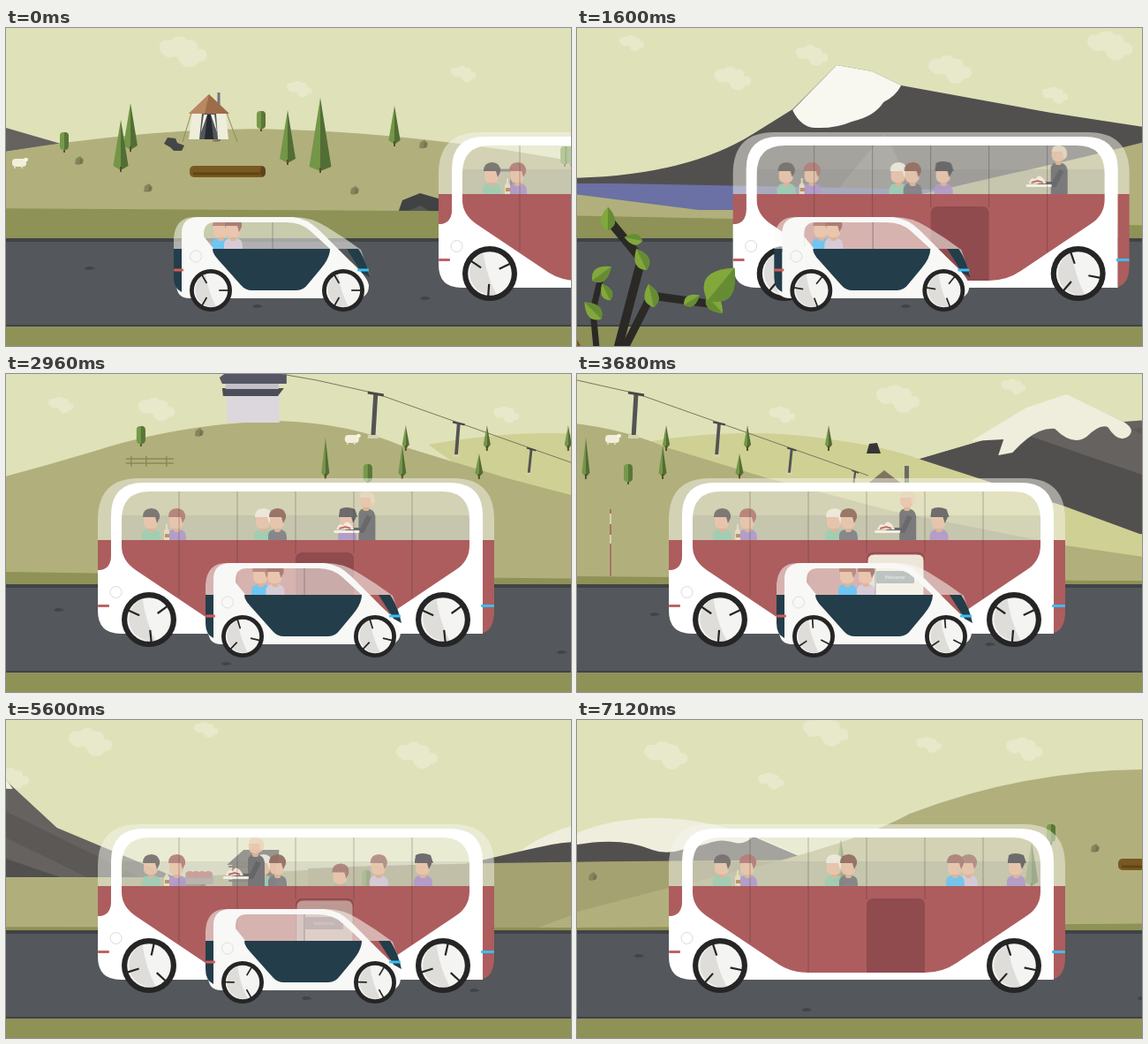
Write an HTML page that moves like this. It is 640 by 360 pixels and loops after 7200 ms.

```html
<!DOCTYPE html>
<html lang="en">
<head>
<meta charset="utf-8">
<title>Bus ride</title>
<style>
html,body{margin:0;width:100%;height:100%;overflow:hidden;background:#dfe1b9}
svg{display:block;width:640px;height:360px}
text{font:italic 6px Lato,sans-serif}
</style>
</head>
<body>
<svg id="stage" viewBox="0 0 640 360"></svg>
<script>
const LOOP = 7200, STEP = 80;
const STOPS = [0, 1040, 2240, 3680, 4800, 6480, 7120];
const OLIVE = '#b1b07c', LIGHT = '#cfd093', GRASS = '#8e9256', RIVER = '#6b70a5';
const DARK = '#52504f', MID = '#65625f', SNOW = '#efeedd', RED = '#ad5d5e';

const ramp = (t, a, b) => Math.max(0, Math.min(1, (t - a) / (b - a)));
const ease = (t, a, b) => { const u = ramp(t, a, b); return u * u * (3 - 2 * u); };
const degrees = a => a * 180 / Math.PI;

// The ride slows down gently
const scroll = t => .555 * t - 1e-5 * t * t;

// Layers: the time at which local places equal screen places, and the relative speed
const LAYERS = {
  far: [0, .95], peak: [1040, 1.05], range: [4800, .91], snow: [6480, .95],
  ground: [0, 1], meadow: [3680, 1.19], near: [0, 1], marks: [0, 1]
};

const path = (d, fill, more = '') => `<path d="${d}" fill="${fill}" ${more}/>`;
const poly = (p, fill) => `<polygon points="${p}" fill="${fill}"/>`;
const rect = (x, y, w, h, fill, r = 0) => `<rect x="${x}" y="${y}" width="${w}" height="${h}" rx="${r}" fill="${fill}"/>`;
const line = (d, color, w = 1) => `<path d="${d}" fill="none" stroke="${color}" stroke-width="${w}"/>`;
const oval = (x, y, a, b, fill) => `<ellipse cx="${x}" cy="${y}" rx="${a}" ry="${b}" fill="${fill}"/>`;
const group = (id, ...body) => `<g id="${id}">${body.join('')}</g>`;
const shift = (x, y, ...body) => `<g transform="translate(${x} ${y})">${body.join('')}</g>`;
const scene = (i, ...body) => shift(scroll(STOPS[i]), 0, ...body);
const skyScene = (i, ...body) => shift(scroll(STOPS[i]) * .95, 0, ...body);
const repeat = (n, f) => Array.from({ length: n }, (_, i) => f(i)).join('');

const cloud = (x, y, k) => `<g transform="translate(${x} ${y}) scale(${k})" fill="#e8e8cb">
  <rect x="-24" y="-12" width="40" height="15" rx="7"/><circle cx="-3" cy="-5" r="11"/>
  <circle cx="7" cy="5" r="11"/><rect x="-5" y="-3" width="30" height="13" rx="6"/><circle cx="-13" cy="-3" r="9"/></g>`;
const cloudPair = (x, y) => cloud(x, y, 1) + cloud(x + 131, y - 14, .57);
const cloudRow = (x, y) => cloud(x, y, 1) + cloud(x + 119, y + 29, .6) + cloud(x + 181, y - 27, 1.05) +
  cloud(x + 298, y - 12, .58) + cloud(x + 406, y - 7, .85);

const cone = (x, base, h, w = h * .3) =>
  poly(`${x},${base - h} ${x - w / 2},${base - 5} ${x},${base}`, '#739647') +
  poly(`${x},${base - h} ${x + w / 2},${base - 5} ${x},${base}`, '#526d35') + rect(x - 1, base - 4, 2, 6, '#59522b');
const bush = (x, top, h = 20) => rect(x - 1, top + h - 4, 2, 7, '#5f552e') +
  rect(x - 5, top, 10, h, '#779a49', 4) + path(`M${x} ${top}q5 0 5 5v${h - 10}q0 5 -5 5z`, '#5a7638');
const rock = (x, y) => path(`M${x - 5} ${y + 4}l1 -6 5 -3 4 4 -1 4 -5 2z`, '#85855d') +
  path(`M${x} ${y + 4}l1 -7 3 3 -1 4z`, '#74744f');
const log = (x, y, w, h = 13) => rect(x, y, w, h, '#795922', 5) +
  line(`M${x + 4} ${y + h * .7}h${w - 10}`, '#624515', 3) + oval(x + w - 3, y + h / 2, 3, h / 2 - .5, '#5d431c');
const sheep = (x, y) => rect(x - 8, y - 4, 16, 9, '#f1efda', 4) + rect(x + 5, y - 5, 5, 4, '#f7f5e4', 2) +
  line(`M${x - 5} ${y + 4}v3m8 -3v3`, '#e5e2c9', 1.5);
const crack = (x, y) => path(`M${x - 6} ${y}l4 -2 5 .5 3 2 -4 1 -5 .5z`, '#414447');

const sky = () =>
  skyScene(0, cloud(200, 27, 1.1), cloud(332, 69, .58), cloud(518, 52, .58), poly('-150,70 0,113 62,131 0,140 -150,160', MID)) +
  skyScene(1, cloudPair(212, 31), cloud(457, 57, .85), cloud(547, 31, .75)) +
  skyScene(2, cloudRow(108, 47)) +
  skyScene(3, cloudPair(363, 28), cloud(232, 46, .6)) +
  skyScene(4, cloudPair(438, 25), cloud(350, 66, .75)) +
  skyScene(5, cloud(102, 40, .95), cloudRow(355, 40));

const peak = () =>
  path('M185 168L290 170Q430 170 510 120L555 92 605 42 645 49 678 65 848 96 1018 122 1140 145V190H185z', DARK) +
  path('M658 120Q681 150 681 190H600z', MID) +
  path('M555 93L605 42 645 49 678 65Q672 77 658 84Q648 100 622 106Q604 114 580 113Q564 112 555 93z', '#f8f8f1');

const range = () =>
  path('M-94 83L-19 61 30 25 75 10 140 40 235 33 290 14 332 72 386 122 520 178H-94z', MID) +
  poly('-94,83 -19,61 30,55 190,110 390,178 -94,180', DARK) + poly('150,49 235,33 260,70 480,178 420,178 250,95', '#5b5856') +
  path('M-33 62L30 24 75 9 138 39Q154 48 146 56Q135 66 122 46Q113 42 98 57Q82 68 62 48Q40 46 14 75L-2 78 4 60z', SNOW) +
  path('M221 34L292 14 336 78Q302 76 281 84Q256 88 251 70Q254 54 237 52Q217 48 221 34z', SNOW);

const snowHill = () =>
  path('M205 160Q260 110 350 111Q430 113 520 160z', SNOW) +
  path('M150 165Q225 147 255 141Q305 132 340 147Q365 156 398 136L450 130 520 160V170H150z', DARK) +
  path('M380 146L400 134 455 131Q444 143 430 138Q417 134 402 140z', SNOW);

const ground = () =>
  scene(1, poly('190,176 340,176 760,184 760,206 190,206', RIVER)) +
  scene(4, path('M-60 184Q300 177 560 178L700 170 1600 164V240H-60z', '#b0ae7b')) +
  scene(5, path('M-40 168Q120 160 640 158V240H-40z', '#a5a271'));

const meadow = () =>
  poly('648,187 1000,187 900,205 735,214', RIVER) +
  path('M60 80Q180 58 280 73Q350 82 390 97L553 150 640 182 740 213H500L200 180z', LIGHT);

const hills = () =>
  path('M-60 150Q150 112 300 114.5Q420 117 566 138L746 168 836 185 1000 206V240H-60z', OLIVE) +
  scene(2, path('M-80 216L0 202 160 165Q320 130 460 88Q560 56 670 53Q750 55 815 83L930 118 1070 155 1267 194 1390 212 1460 240H-80z', OLIVE)) +
  scene(6, path('M-60 240L0 217 104 190Q307 145 377 106Q507 57 640 56L760 56V240z', OLIVE));

function scenery() {
  const camp = line('M210 96L200 129M250 96L262 129', '#8d8a62') + rect(239.5, 73, 3, 17, '#77727a') +
    poly('211,97 249,97 252,126 207,126', '#efeddb') + poly('222,97 238,97 240,126 219,126', '#53565a') +
    poly('228,98 232,98 235,126 225,126', '#252a30') + poly('224,98 228,98 221,118', '#f7f4e5') + poly('236,98 232,98 239,118', '#f7f4e5') +
    poly('207,97 230,75 253,97', '#9d6c49') + poly('207,97 230,75 225,97', '#b88862') +
    path('M179 131l4 -7 9 1 2 5 8 3 -3 6h-9l-4 -4z', '#454646');
  const boulder = path('M441 218l8 -23 20 -8 24 7 10 14 -8 21 -45 -1z', '#414244') + path('M450 209l20 -8 20 14v13h-40z', '#535455');
  const hiker = shift(132, 0, oval(0, 134, 4, 5, '#e0b99a'), path('M-5 132q1 -4 6 -3l4 5z', '#a55b54'),
    rect(2, 142, 7, 13, '#85888d', 2), rect(-4, 139, 8, 17, '#56575e', 3),
    line('M-1 154L-2 176M2 154L6 175', '#43434b', 4), line('M-4 177h4m4 -1h4', '#eee2c6', 3),
    line('M-4 145L-9 151M-9 149L-19 173', '#73664d', 1.5));
  const fence = line('M498 96h54M498 101h54M504 93v12m17 -12v12m23 -12v12', '#898a51', 1.4);
  const tower = rect(612, 24, 60, 31, '#dcd7dc') + poly('607,16 677,16 670,25 608,25', '#4d4d59') +
    rect(611, 9, 60, 8, '#c4c0c8') + poly('604,4 620,-8 680,-8 680,11 607,11', '#565764');
  const stake = (x, y, h) => line(`M${x} ${y}v${h}`, '#a97369', 2) + line(`M${x} ${y + 5}v12m0 12v10`, '#d9d0ad', 2);
  // Pylons shrink into the distance
  const pylon = i => {
    const k = .76 ** i, x = 67 + 94 * (1 - .875 ** i) / .125, y = 22 + (x - 67) * .355;
    return line(`M${x} ${y}l-3 ${50 * k}`, '#535354', 5 * k) + line(`M${x - 9 * k} ${y - 1}l${18 * k} 3`, '#484849', 3 * k) +
      rect(x - 3 - 6 * k, y + 47 * k, 12 * k, 4 * k, '#d6d1b3');
  };
  const lift = line('M-40 0L0 7 67 22 330 115', '#77785f') + repeat(4, pylon) + poly('328,90 331,79 340,78 344,90', '#343638');
  const cabin = log(550, 182, 37, 11) + rect(563, 177, 33, 9, '#8f8a83', 2) + repeat(4, i => oval(569 + 7 * i, 175, 5, 4, '#b75751')) +
    rect(617, 158, 50, 40, '#493e2c') + repeat(4, i => line(`M613 ${166 + 8 * i}h54`, '#342e25', 2)) +
    poly('611,164 630,147 670,147 670,164', '#373732');

  return repeat(6, i => rock(83 + 78 * i, 150 + 34 * Math.sin(i * 2))) +
    cone(141, 138, 53) + cone(130, 161, 57) + cone(319, 153, 60) + cone(356, 162, 83) + cone(440, 132, 44) +
    bush(66, 118) + bush(289, 94) + bush(633, 134) + camp + log(208, 156, 86) + sheep(15, 152) + boulder +
    scene(1, bush(74, 134), bush(236, 169), hiker, line('M-25 161H10V226M6 158V224', '#44443f', 3)) +
    scene(2, bush(515, 59), rock(581, 66), fence, tower, stake(486, 148, 38)) +
    scene(3, lift, repeat(3, i => cone(101 + 92 * i, 85, 27) + cone(10 + 87 * i, 117, 45 - 9 * i, 9)),
      bush(58, 102), sheep(40, 73), stake(38, 153, 76), poly('320,132 348,109 378,132', '#80745f'), rect(371, 104, 5, 25, '#6b6968')) +
    scene(4, bush(489, 155), cabin) +
    scene(5, bush(26, 170), cone(567, 188, 53)) +
    scene(6, bush(537, 118), cone(515, 188, 50), rock(18, 177), rock(587, 145), log(613, 157, 86));
}

const marks = () => repeat(22, i => crack(95 + 190 * i, [272, 315, 306, 267, 328][i % 5]));
const strip = poly('-60,204 640,208 1193,219 1907,229 2500,234 3445,235 4300,229 4300,242 -60,242', GRASS);

function wheel(cls, x, y, r) {
  const q = r * .8;
  return shift(x, y, `<circle r="${r}" fill="#252525"/><circle r="${q}" fill="#f4f4f2"/>`,
    path(`M${-q * .3} ${-q * .95}A${q} ${q} 0 0 0 ${q * .3} ${q * .95}Q${-q * .15} ${q * .1} ${-q * .3} ${-q * .95}z`, '#deddda'),
    `<g class="${cls}">`, repeat(3, i => `<path transform="rotate(${120 * i})" d="M${q * .48} 0H${q + 1}" stroke="#252525" stroke-width="${r / 14}"/>`), '</g>');
}

// Seated figure whose waist is at the local zero point
const person = (shirt, hair, hat) =>
  path('M-10 1V-6Q-9 -12 -2 -12H4Q11 -11 11 -3V1z', shirt) + rect(-3, -17, 7, 8, '#deb59b', 2) +
  rect(-8, -30, 16, 17, '#e9c6ad', 6) + path('M-9 -26Q-9 -36 1 -36Q11 -35 10 -25L7 -19 5 -26z', hair) +
  (hat ? path('M-9 -27L-8 -35Q-1 -39 9 -35L12 -26z', hair) : '');

const waiter = path('M-9 1V-30Q-8 -36 0 -36Q9 -35 10 -27V1z', '#747477') + rect(-4, -41, 7, 8, '#ddb493', 2) +
  rect(-8, -53, 15, 16, '#e9c6ad', 6) + path('M-8 -48Q-8 -56 1 -55Q11 -54 9 -42L6 -39 4 -48z', '#e8d8c1') +
  line('M3 -27L-5 -11H-24', '#626266', 6) + rect(-37, -11, 29, 3, '#f5f2e9', 1) +
  path('M-34 -12q2 -8 8 -5 3 -7 9 0l3 5z', '#f7eee0') + line('M-31 -13l7 -2 6 2', '#c06961', 2);

// Riders: looks, place along the bus, boarding time
const riders = [
  { look: ['#9fceb4', '#77716f'], x: () => 60 },
  { look: ['#b29bcb', '#b48079'], x: () => 89 },
  { look: ['#9fceb4', '#eeeade'], x: () => 187 },
  { look: ['#828286', '#956d63'], x: () => 203 },
  { look: ['#b29bcb', '#656366', true], x: t => Math.min(393, 186 + .0325 * t) },
  { look: ['#d7cbd8', '#b28c84'], x: t => 257 + 82 * ease(t, 5000, 5900), board: 5000 },
  { look: ['#70c5f2', '#ab817a'], x: t => 257 + 67 * ease(t, 5300, 6200), board: 5300 }
];

const bus = () =>
  path('M104 188V165Q104 118 151 118H506Q553 118 553 165V188z', 'rgba(246,246,238,.5)') +
  rect(131, 160, 394, 28, 'rgba(120,120,120,.14)') +
  '<g opacity=".92">' + riders.map((r, i) => group('rider' + i, person(...r.look))).join('') + group('waiter', waiter) +
  path('M179 188v-10l2 -3v-5h2v5l2 3v10z', '#e8dfc3') + rect(180, 181, 5, 4, '#b99165') + '</g>' +
  path('M119 188V160Q119 123 156 123H502Q540 123 540 160V294H130Q104 294 104 268V222Q119 222 119 205zM131 188V165Q131 133 163 133H493Q525 133 525 165V188z', '#fff', 'fill-rule="evenodd"') +
  path('M104 188H119V205Q119 222 104 222z', RED) + path('M540 188H553V268Q553 290 540 293z', RED) +
  path('M131 188H525V194Q525 212 509 222L430 275Q414 286 394 286H262Q243 286 229 277L147 222Q131 211 131 195z', RED) +
  path('M328 286V210Q328 202 336 202H386Q394 202 394 210V286z', '#8f4b4e') +
  group('door', path('M329 286V212Q329 204 337 204H385Q393 204 393 212V286z', '#eee7d9', `stroke="${RED}"`),
    rect(331, 220, 7, 66, '#cfccc4'), rect(339, 223, 43, 14, '#777e80', 1),
    '<text x="360" y="232" text-anchor="middle" fill="#e2ede7">Welcome</text>') +
  repeat(5, i => line(`M${196 + 66 * i} 133V${[252, 286, 203, 203, 254][i]}`, 'rgba(65,45,45,.4)', .8)) +
  rect(104, 261, 13, 3, '#bd6463', 1) + rect(538, 261, 15, 3, '#39bff4', 1) +
  '<circle cx="124.500" cy="247" r="6.500" fill="none" stroke="#dadada"/>' +
  wheel('busSpin', 162, 278, 31) + wheel('busSpin', 495, 278, 31);

function car() {
  const panel = '#233d4a';
  return path('M226 250V238Q228 214 249 214H362Q382 214 399 225Q419 237 438 251L448 280 424 250z', 'rgba(250,250,244,.55)') +
    group('friendA', person('#70c5f2', '#ba8b80')) + group('friendB', person('#d7cbd8', '#aa7d76')) +
    path('M235 250V232Q235 214 255 214H360Q377 215 392 230L426 264Q445 281 447 291Q447 306 432 306H244Q229 306 229 290L235 286zM260 250V233Q260 220 273 220H354Q370 220 381 230L403 250z', '#f8f8f6', 'fill-rule="evenodd"') +
    path('M260 236L272 251H260z', '#f8f8f6') +
    path('M226 250H235V299Q226 295 226 282z', panel) + path('M422 250H435Q444 263 448 282L439 277z', panel) +
    path('M270 250H403Q403 260 393 272L378 290Q373 297 365 297H315Q307 297 302 291L277 263Q270 256 270 250z', panel) +
    line('M338 220V250', 'rgba(60,60,70,.45)', .8) +
    rect(226, 272.5, 11, 3, '#d35c58', 1) + rect(434, 272.5, 13, 3, '#39bff4', 1) +
    '<circle cx="251" cy="258.500" r="6.500" fill="none" stroke="#e0dfdb"/>' +
    wheel('carSpin', 268, 297, 24) + wheel('carSpin', 418, 297, 24);
}

const oncoming = () => path('M551 221L553 196Q556 186 572 186H690Q744 188 755 217V251H562Q551 250 551 238z', '#f5f5ef') +
  path('M553 208V200Q556 191 570 191H690Q722 192 735 209z', '#d4d5bd') +
  path('M548 210H622Q621 220 611 232Q603 243 594 243H570Q557 241 551 230z', '#a1d7bb') +
  rect(552, 215, 15, 3, '#fff', 1) + wheel('fastSpin', 634, 244, 18) + wheel('fastSpin', 724, 244, 18);

function branch() {
  const leaf = (x, y, n, a, w = n * .6) => `<g transform="translate(${x} ${y}) rotate(${a})">` +
    path(`M${-n / 2} 0Q${-n / 6} ${-w} ${n / 2} 0Q${-n / 6} ${w} ${-n / 2} 0z`, '#82a83c') +
    path(`M${-n / 2} 0Q${-n / 6} ${w} ${n / 2} 0z`, '#668c33') + '</g>';
  // Each stem carries leaves along its pieces, turned to alternate sides
  const stem = (color, w, ...p) => line('M' + p.join('L'), color, w) + p.slice(1).map(([x, y], i) => {
    const [a, b] = p[i], dir = degrees(Math.atan2(y - b, x - a)), side = i % 2 ? 40 : -40;
    return leaf(x, y, 27, dir + side) + (b < 340 ? leaf((x + a) / 2 + side / 4, (y + b) / 2, 21, dir - side) : '');
  }).join('');
  const brown = '#66490f', black = '#2b2926';
  return stem(brown, 6, [372, 320], [374, 243], [345, 222]) + stem(brown, 8, [350, 362], [325, 333], [262, 345]) +
    stem('#79582a', 10, [392, 362], [350, 300], [304, 280]) + stem(black, 10, [438, 364], [465, 262], [427, 216]) +
    stem(black, 9, [446, 362], [476, 303], [548, 313]) + stem(black, 7, [414, 362], [410, 320], [420, 278]) +
    leaf(345, 208, 50, -90, 32) + leaf(255, 332, 54, -75, 35) + leaf(555, 290, 48, -50, 34);
}

document.getElementById('stage').innerHTML = rect(0, 0, 640, 360, '#dfe1b9') +
  group('far', sky()) + group('peak', peak()) + group('range', range()) + group('snow', snowHill()) +
  rect(0, 203, 640, 40, OLIVE) + group('ground', ground()) + group('meadow', meadow()) +
  group('near', hills(), scenery(), strip) +
  rect(0, 238, 640, 99, '#54575b') + rect(0, 238, 640, 4, '#404346') + group('marks', marks()) +
  rect(0, 336, 640, 2.5, '#414440') + rect(0, 338.5, 640, 22, GRASS) +
  group('oncoming', oncoming()) + group('bus', bus()) + group('car', car()) + group('branch', branch());

const node = {};
document.querySelectorAll('[id]').forEach(e => node[e.id] = e);
const move = (id, x, y = 0) => node[id].setAttribute('transform', `translate(${x.toFixed(2)} ${y.toFixed(2)})`);
const show = (id, a) => node[id].setAttribute('opacity', a);
const spin = (cls, a) => document.querySelectorAll('.' + cls).forEach(e => e.setAttribute('transform', `rotate(${a})`));

function draw(t) {
  for (const id in LAYERS) {
    const [t0, speed] = LAYERS[id];
    move(id, (scroll(t0) - scroll(t)) * speed, id === 'range' ? 14 * (1 - ramp(t, 3680, 4800)) : 0);
  }

  move('bus', 386 * (1 - ramp(t, 0, 2400)) ** 1.52);
  riders.forEach(({ x, board }, i) => {
    move('rider' + i, 104 + x(t), 188 + (board ? 42 * (1 - ramp(t, board, board + 400)) : 0));
    show('rider' + i, board > t ? 0 : 1);
  });
  move('waiter', 549 - .0475 * t, 188);
  show('waiter', 1 - ramp(t, 6720, 6960));
  show('door', ramp(t, 2960, 3280) - ramp(t, 5440, 5760));

  const lead = 1.937e-4 * Math.max(0, t - 5600) ** 2;
  move('car', lead - 36 * (1 - ramp(t, 0, 2200)) ** 2);
  const turn = ease(t, 2500, 3680);
  move('friendA', 279 + 27 * turn + 59 * ease(t, 3700, 4700), 250);
  move('friendB', 293 + 34 * turn + 38 * ease(t, 3700, 4300), 250);
  show('friendA', 1 - ramp(t, 5040, 5200));
  show('friendB', 1 - ramp(t, 4320, 4480));

  move('oncoming', (6480 - t) * 1.2);
  move('branch', (1040 - t) * .7);
  spin('busSpin', 94 + .848 * t);
  spin('carSpin', 1.018 * t + degrees(lead / 24));
  spin('fastSpin', -t * 2.4);
}

function tick(now) {
  draw(Math.floor(now % LOOP / STEP) * STEP);
  requestAnimationFrame(tick);
}
draw(0);
requestAnimationFrame(tick);
</script>
</body>
</html>
```
